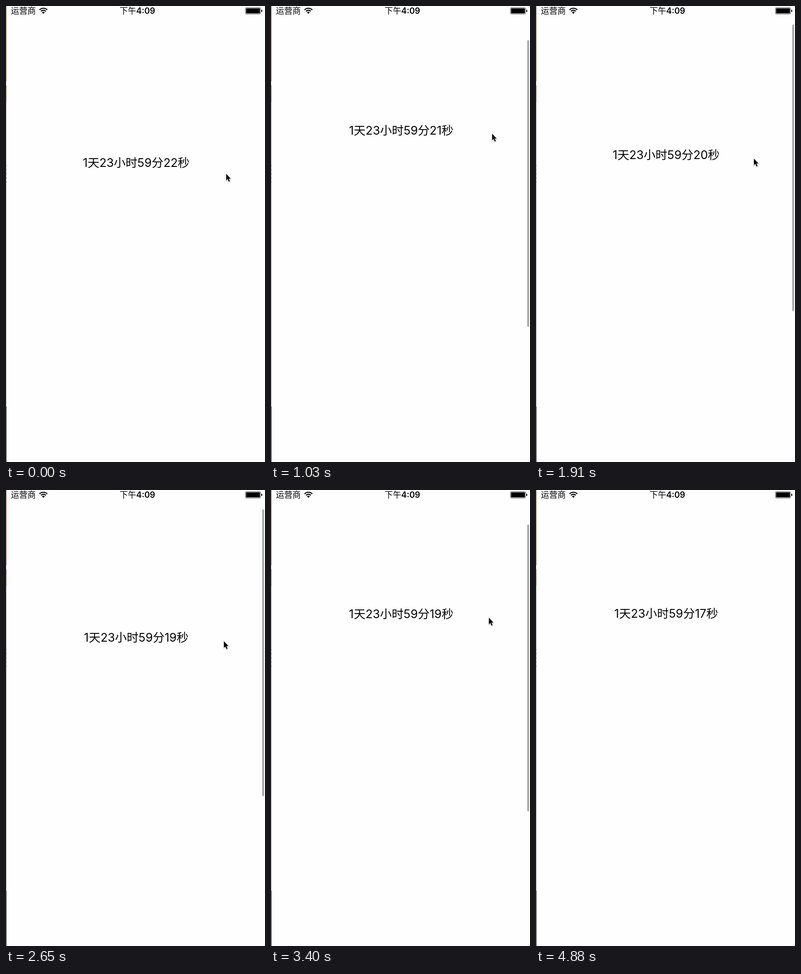
These frames come from a looping animation (561 px wide and 989 px high, 5120 ms). An HTML page:

```html
<!DOCTYPE html>
<html lang="zh-CN">
<head>
<meta charset="utf-8">
<title>倒计时</title>
<style>
  html, body { margin: 0; width: 100%; height: 100%; overflow: hidden; background: #fefefe; }
  svg { display: block; width: 561px; height: 989px; }
  text { font-family: Inter, "Noto Sans CJK SC", "Noto Sans CJK", sans-serif; fill: #050505; }
  .status { font-size: 18px; }
  #countdown { font-size: 25.5px; text-anchor: middle; }
</style>
</head>
<body>
<svg viewBox="0 0 561 989">
  <!-- sliver of the desktop beside the window -->
  <g shape-rendering="crispEdges">
    <rect id="desk" width="1" height="208"/>
    <rect y="163" width="1" height="9" fill="#c4c4cc"/>
    <rect id="edge" y="208" width="1" height="661"/>
    <path d="M.5 345V386" stroke="#444" stroke-dasharray="2 7"/>
    <rect y="869" width="1" height="120" fill="#061012"/>
  </g>

  <text class="status" x="10.5" y="17">运营商</text>
  <g fill="none" stroke="#050505" stroke-width="2.4">
    <path d="M72.6 8.4a11.8 11.8 0 0 1 16.8 0M75.6 11.5a7.6 7.6 0 0 1 10.8 0"/>
    <path d="M81 17l-3.1-3.2a4.4 4.4 0 0 1 6.2 0z" fill="#050505" stroke="none"/>
  </g>
  <text class="status" x="284.5" y="17" text-anchor="middle" font-weight="600"><tspan font-weight="500">下午</tspan>4:09</text>
  <rect x="518.5" y="3.5" width="33" height="14" rx="2.5" fill="none" stroke="#444"/>
  <rect x="520" y="5" width="30" height="11" rx="1"/>
  <path d="M553 8h.5a1.5 1.5 0 0 1 1.5 1.5v2a1.5 1.5 0 0 1-1.5 1.5h-.5z"/>

  <text id="countdown" x="282"></text>
  <rect id="scrollbar" x="555" width="4" height="622" rx="2"/>
  <g id="cursor">
    <path d="M0 0V14.2l3.1-2.9 2.5 5.6 2.3-1-2.4-5.4h4.3z" stroke="#fff" stroke-width="1.4" paint-order="stroke"
      style="filter: drop-shadow(0 1px 1px #0005)"/>
  </g>
</svg>
<script>
const LOOP = 5120;
const HOLD = 146.8;       // the picture is refreshed at this interval
const FIRST_TICK = 600;
const TOUCH = 280;
const LEAVE = 4250, GONE = 4880;

const $ = id => document.getElementById(id);
const set = (id, attributes) => {
  for (const name in attributes) $(id).setAttribute(name, attributes[name]);
};

function ease(t, begin, end) {
  const k = Math.min(1, Math.max(0, (t - begin) / (end - begin)));
  return k * k * (3 - 2 * k);
}

// Adds eased moves, each given as [begin, end, distance].
const travel = (t, start, ...moves) => Math.round(
  moves.reduce((sum, [begin, end, distance]) => sum + distance * ease(t, begin, end), start));

function draw(time) {
  const t = Math.floor(time / HOLD) * HOLD;
  const touched = t >= TOUCH;

  const labelY = travel(t, 340, [300, 840, -70], [980, 2200, 62], [2323, 3461, -64]);
  const gap = travel(t, 24, [0, 300, -18], [900, 1400, 7], [1500, 1900, -5], [LEAVE, GONE, 730]);
  const cursorX = travel(t, 477, [0, 580, 5], [600, 1460, -7], [1480, 1900, -3], [LEAVE, GONE, 55]);
  const seconds = 22 - Math.ceil(Math.max(0, t - FIRST_TICK) / 1000);

  $("countdown").textContent = `1天23小时59分${seconds}秒`;
  set("countdown", { y: labelY + 9 });
  set("scrollbar", {
    y: Math.round(75 - (labelY - 269) * .647),
    opacity: touched ? .35 * (1 - ease(t, 3830, 4100)) : 0
  });
  set("cursor", { transform: `translate(${cursorX} ${labelY + gap})` });
  set("desk", { fill: touched ? "#8b5a3c" : "#a5683f" });
  set("edge", { fill: touched ? "#969696" : "#a6a6a6" });
}

const begin = performance.now();
function frame() {
  draw((performance.now() - begin) % LOOP);
  requestAnimationFrame(frame);
}
frame();
</script>
</body>
</html>
```
